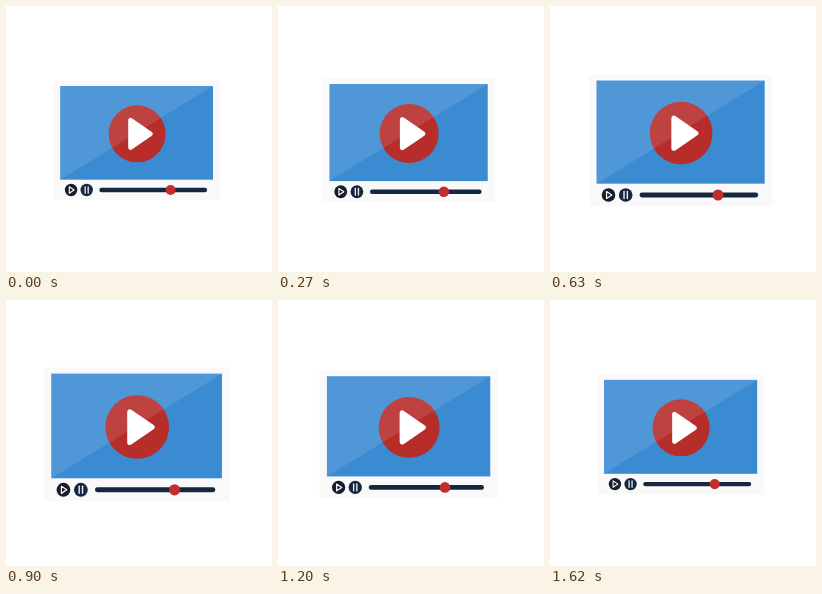
Write an HTML page with a canvas that moves like this. It is 266 px wide and 266 px high and loops after 1650 ms.

```html
<!DOCTYPE html>
<html lang="en">
<head>
<meta charset="utf-8">
<title>Video player</title>
<style>
html, body { margin: 0; width: 100%; height: 100%; overflow: hidden; background: #fff; }
canvas { display: block; width: 100vmin; height: 100vmin; }
</style>
</head>
<body>
<canvas id="stage"></canvas>
<script>
const SIZE = 266, LOOP = 1650, STEP = 30, GROWTH = 0.124;
const CENTER = { x: 130.6, y: 134.4 };
const NAVY = '#14273f';
const canvas = document.getElementById('stage');
const ctx = canvas.getContext('2d');

function rect(x, y, w, h, color) {
  ctx.fillStyle = color;
  ctx.fillRect(x, y, w, h);
}

function disc(x, y, r, color) {
  ctx.fillStyle = color;
  ctx.beginPath();
  ctx.arc(x, y, r, 0, Math.PI * 2);
  ctx.fill();
}

function trace(points, close) {
  ctx.beginPath();
  points.forEach(([x, y]) => ctx.lineTo(x, y));
  if (close) ctx.closePath();
}

function stroke(points, width, color, close = false) {
  trace(points, close);
  ctx.lineWidth = width;
  ctx.strokeStyle = color;
  ctx.stroke();
}

function drawScreen() {
  const left = 54.2, top = 80, right = 207, bottom = 173.7;
  rect(left, top, right - left, bottom - top, '#3b8bd2');
  disc(131.1, 127.8, 28.5, '#b62d2a');

  // Glossy upper-left half
  trace([[left, top], [right, top], [left, bottom]], true);
  ctx.fillStyle = 'rgba(255, 255, 255, 0.1)';
  ctx.fill();

  const arrow = [[124.5, 114.2], [124.5, 141.6], [144.5, 127.9]];
  stroke(arrow, 4.6, '#fff', true);
  ctx.fillStyle = '#fff';
  ctx.fill();
}

function drawControls() {
  const y = 184;
  disc(65.1, y, 6.2, '#171c2b');
  stroke([[63.3, y - 3.2], [63.3, y + 3.2], [68.1, y]], 1.1, '#fff', true);
  disc(80.7, y, 6.2, NAVY);
  for (const x of [79.2, 82.2]) stroke([[x, y - 3.2], [x, y + 3.2]], 1.3, '#e8edf2');
  stroke([[95.5, y], [198.9, y]], 4.4, NAVY);
  disc(164.6, y, 5, '#c12e2d');
}

// Growth between a straight ramp and a smooth one, up then back
function pulse(time) {
  const p = 1 - Math.abs(1 - 2 * time / LOOP);
  return 1 + GROWTH * (p + p * p * (3 - 2 * p)) / 2;
}

function draw(now) {
  const time = Math.floor((now % LOOP) / STEP) * STEP;
  const pixels = Math.round(Math.min(innerWidth, innerHeight) * devicePixelRatio);
  if (canvas.width !== pixels) canvas.width = canvas.height = pixels;
  const unit = pixels / SIZE, scale = pulse(time);

  ctx.setTransform(unit, 0, 0, unit, 0, 0);
  rect(0, 0, SIZE, SIZE, '#fff');
  ctx.translate(CENTER.x, CENTER.y);
  ctx.scale(scale, scale);
  ctx.translate(-CENTER.x, -CENTER.y);
  ctx.lineCap = ctx.lineJoin = 'round';

  rect(47.4, 74.6, 166.4, 119.6, '#f9f9fa');
  drawScreen();
  drawControls();
}

const start = performance.now();
function tick() {
  draw(performance.now() - start);
  requestAnimationFrame(tick);
}
tick();
</script>
</body>
</html>
```
